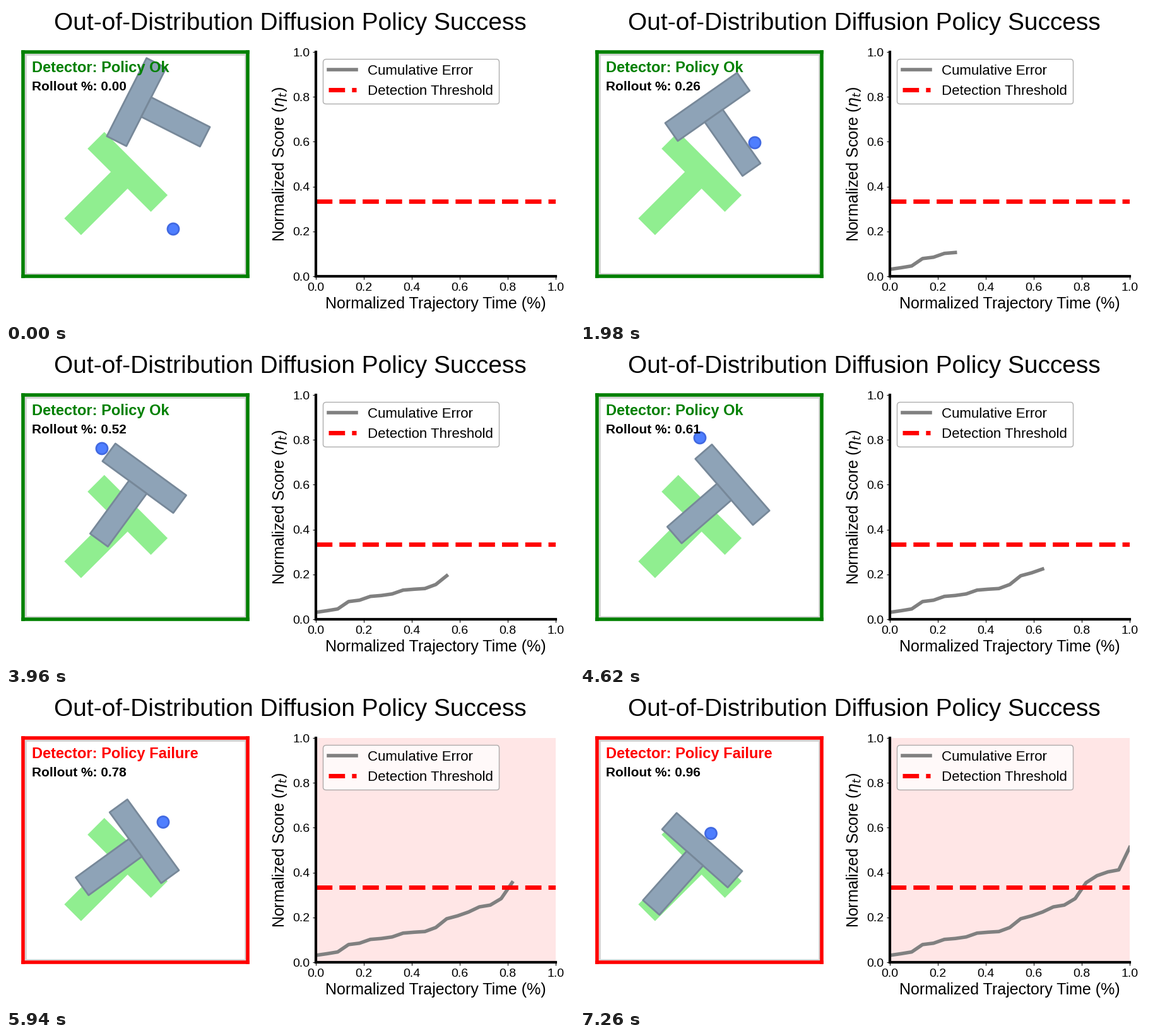
Recreate the animation shown at these times as a matplotlib script. Size 900 by 500 pixels, loop 9590 ms.

```python
import numpy as np
import matplotlib.pyplot as plt
from matplotlib.animation import FuncAnimation
from matplotlib.patches import Circle, Polygon, Rectangle

plt.rcParams["font.family"] = "Liberation Sans"

W, H, DPI = 900, 500, 100
INTERVAL, FRAMES = 35, 274
STEP_MS, LAST = 330, 22
THRESHOLD = 0.333
UNIT = 34.77            # width of the T's bars in pixels
CENTROID = 1.357        # distance from the T's top to its centroid, in units

# Cumulative error at each step
SCORE = [.031, .038, .046, .079, .085, .102, .106, .113, .130, .134, .137, .155,
         .194, .207, .224, .247, .255, .284, .355, .386, .403, .412, .512]

# Pusher centre at each step
AGENT = [(265, 354), (338, 235), (308, 88), (270, 80), (245, 81), (304, 178),
         (277, 217), (215, 247), (174, 310), (41, 262), (60, 172), (107, 160),
         (152, 158), (183, 154), (190, 141), (228, 107.5), (284, 165),
         (257.5, 228), (249, 206.5), (236, 192), (216, 208), (212, 212),
         (207.5, 224.5)]

# Block pose (step, x, y, stem angle); it rests or moves evenly between these
POSES = np.array([
    (0, 233.3, 166, 26.9), (4, 233.3, 166, 26.9), (5, 234, 168.5, 32),
    (6, 219, 184.5, 55), (7, 179, 202, 82), (8, 160, 209.3, 103.1),
    (10, 160, 209.3, 103.1), (11, 171, 216, 113), (12, 201.6, 229.2, 126.2),
    (13, 217, 234, 137), (14, 219, 235, 139), (15, 220, 235, 140),
    (16, 220, 235, 140), (17, 200.4, 249.5, 142.6), (18, 195, 254.5, 144),
    (19, 195, 254.5, 144), (20, 187.6, 265.4, 139), (21, 184, 267.5, 136),
    (22, 173.8, 273.4, 131.6)])


def block_pose(step):
    return [np.interp(step, POSES[:, 0], POSES[:, i]) for i in (1, 2, 3)]


def tee(x, y, angle):
    """Corners of the crossbar and the stem of a T."""
    a = np.radians(angle)
    along = np.array([np.cos(a), np.sin(a)])
    across = np.array([-along[1], along[0]])

    def bar(half, top, bottom):
        corners = [(-half, top), (half, top), (half, bottom), (-half, bottom)]
        return [np.array([x, y]) + UNIT * (p * across + (q - CENTROID) * along)
                for p, q in corners]

    return bar(2, 0, 1), bar(0.5, 1, 4)


def add_tee(ax, pose, face, edge, join, zorder):
    return [ax.add_patch(Polygon(pts, closed=True, fc=face, ec=edge, lw=2,
                                 joinstyle=join, zorder=zorder))
            for pts in tee(*pose)]


def add_axes(left, top, right, bottom):
    return fig.add_axes([left / W, 1 - bottom / H,
                         (right - left) / W, (bottom - top) / H])


fig = plt.figure(figsize=(W / DPI, H / DPI), dpi=DPI, facecolor="white")
fig.suptitle("Out-of-Distribution Diffusion Policy Success", fontsize=28)

# Scene, in stage pixels
scene = add_axes(27, 73, 383, 429)
scene.set(xlim=(27, 383), ylim=(429, 73), xticks=[], yticks=[])
scene.spines[:].set_linewidth(4)

add_tee(scene, (171.6, 284.4, 135), "lightgreen", "lightgreen", "miter", 1)
block = add_tee(scene, block_pose(0), (142/255, 163/255, 183/255),
                "lightslategray", "round", 1.2)
agent = [scene.add_patch(Circle(AGENT[0], r, fc=c, lw=0, zorder=1.1))
         for r, c in ((10.4, "royalblue"), (7.7, (78/255, 126/255, 1)))]
scene.add_patch(Rectangle((30.5, 76.5), 348.3, 348.3, fill=False,
                          ec="lightgray", lw=2, zorder=1.3))
status = scene.text(41.2, 105, "", fontsize=17, weight="bold")
rollout = scene.text(41.2, 134, "", fontsize=15, weight="bold")

# Score chart
chart = add_axes(491, 73, 871, 429)
chart.set(xlim=(0, 1), ylim=(0, 1))
chart.spines[["top", "right"]].set_visible(False)
chart.spines[["left", "bottom"]].set_linewidth(3)
chart.tick_params(labelsize=14)
chart.set_xlabel("Normalized Trajectory Time (%)", fontsize=18)
chart.set_ylabel(r"Normalized Score ($\eta_t$)", fontsize=18)
error_line, = chart.plot([], [], color="gray", lw=4, label="Cumulative Error")
chart.plot([0, 1], [THRESHOLD] * 2, "--", color="red", lw=5,
           label="Detection Threshold")
chart.legend(loc="upper left", fontsize=16, edgecolor="0.6")


def update(frame):
    step = min(LAST, (frame * INTERVAL + INTERVAL - 1) // STEP_MS)
    failed = SCORE[step] > THRESHOLD
    color = "red" if failed else "green"

    for patch, pts in zip(block, tee(*block_pose(step))):
        patch.set_xy(pts)
    for disc in agent:
        disc.center = AGENT[step]
    status.set(text=f"Detector: Policy {'Failure' if failed else 'Ok'}",
               color=color)
    rollout.set_text(f"Rollout %: {step / (LAST + 1):.2f}")
    scene.spines[:].set_color(color)

    # A single point would show up as a blob, so start with two
    count = step + 1 if step else 0
    error_line.set_data(np.arange(count) / LAST, SCORE[:count])
    chart.set_facecolor((1, 0.9, 0.9) if failed else "white")


anim = FuncAnimation(fig, update, frames=FRAMES, interval=INTERVAL,
                     init_func=lambda: update(0), repeat=True, repeat_delay=0)
plt.show()
```
